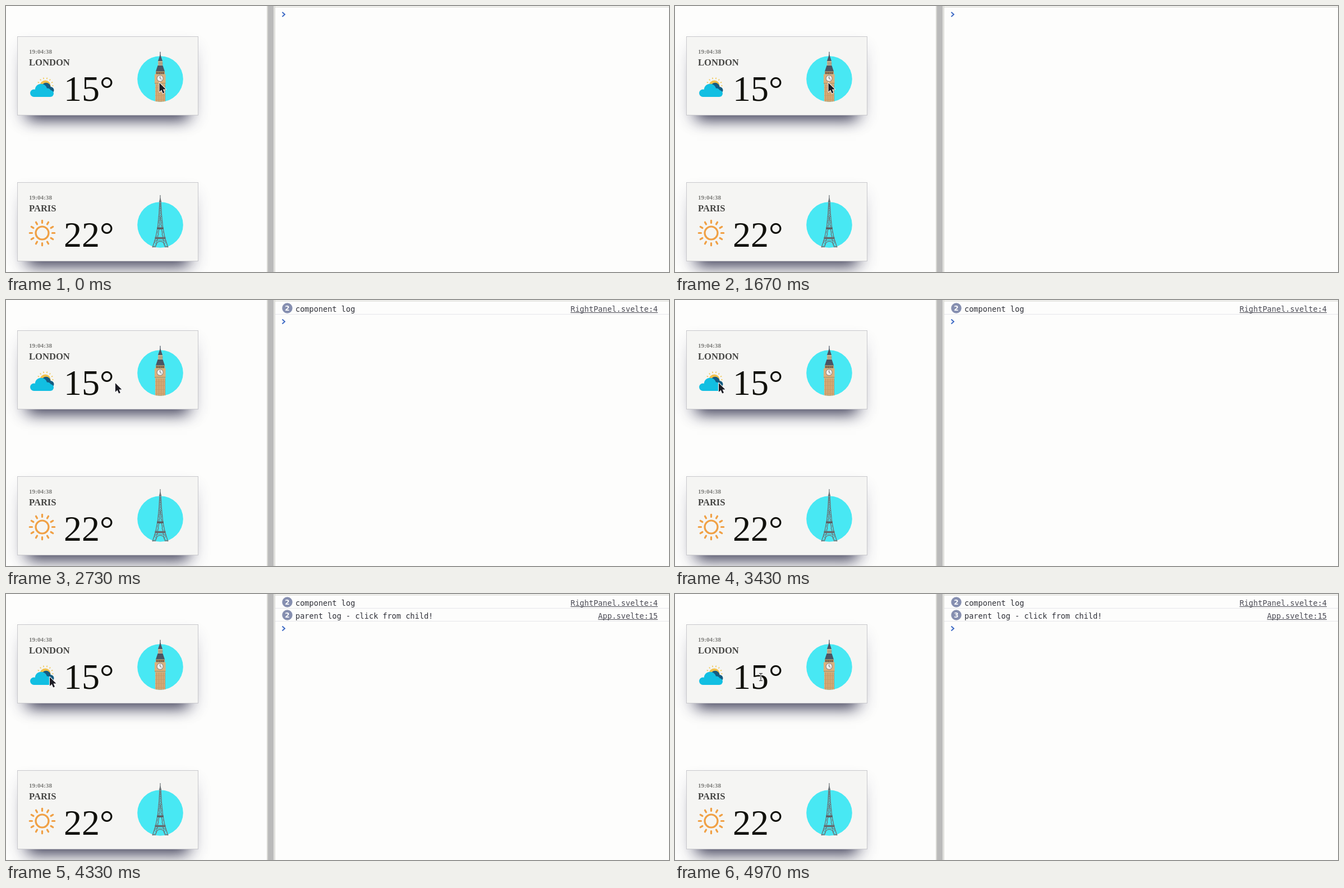
An HTML page with a canvas that plays this animation: 1182 by 474 pixels, repeating every 5.01 s.

```html
<!DOCTYPE html>
<html lang="en">
<head>
<meta charset="utf-8">
<title>Weather cards and console</title>
<style>
  html, body { margin: 0; width: 100%; height: 100%; overflow: hidden; background: #fdfdfc; }
  canvas { display: block; }
</style>
</head>
<body>
<canvas id="stage" width="1182" height="474"></canvas>
<script>
const ctx = document.getElementById('stage').getContext('2d');
const LOOP = 5010;
const SERIF = '"Liberation Serif", serif';
const MONO = '13.6px "DejaVu Sans Mono", monospace';
const SKY = '#48e8f3';
const COMPONENT_CLICKS = [1800, 2200];
const PARENT_CLICKS = [3850, 4100, 4420];

function rect(x, y, w, h, color) {
  ctx.fillStyle = color;
  ctx.fillRect(x, y, w, h);
}

function disc(x, y, r, color) {
  ctx.fillStyle = color;
  ctx.beginPath();
  ctx.arc(x, y, r, 0, Math.PI * 2);
  ctx.fill();
}

function trace(points) {
  ctx.beginPath();
  points.forEach(([x, y]) => ctx.lineTo(x, y));
}

function poly(points, color) {
  trace(points);
  ctx.closePath();
  ctx.fillStyle = color;
  ctx.fill();
}

function line(points, color, width) {
  trace(points);
  ctx.strokeStyle = color;
  ctx.lineWidth = width;
  ctx.stroke();
}

function text(str, x, y, font, color, align = 'left') {
  ctx.font = font;
  ctx.fillStyle = color;
  ctx.textAlign = align;
  ctx.fillText(str, x, y);
}

function rays(x, y, count, inner, outer, color, width) {
  for (let i = 0; i < count; i++) {
    const a = i * Math.PI * 2 / count;
    const c = Math.cos(a), s = Math.sin(a);
    line([[x + c * inner, y + s * inner], [x + c * outer, y + s * outer]], color, width);
  }
}

function smooth(t, start, end) {
  const u = Math.min(1, Math.max(0, (t - start) / (end - start)));
  return u * u * (3 - 2 * u);
}

// Casts only the shadow: the caster itself stays far off the stage.
function shadow(x, y, w, h, dy, blur, spread, color) {
  const away = 3000;
  ctx.save();
  ctx.shadowColor = color;
  ctx.shadowBlur = blur;
  ctx.shadowOffsetX = away;
  ctx.shadowOffsetY = dy;
  rect(x - spread - away, y - spread, w + spread * 2, h + spread * 2, '#000');
  ctx.restore();
}

function cloudyIcon() {
  const back = '#155b80', front = '#12bfe2';
  ctx.lineCap = 'round';
  rays(70, 142, 14, 12.8, 14, '#f0c95c', 1.7);
  disc(70, 142, 9.5, '#efc04c');
  disc(71.5, 145, 8.2, back);
  disc(79.5, 150, 6, back);
  disc(49.8, 155.3, 6.7, front);
  disc(62.5, 149.5, 10.8, front);
  disc(74, 153, 6.5, front);
  disc(79, 156, 6, front);
  rect(49.8, 151, 29.2, 11, front);
}

function sunnyIcon() {
  ctx.lineCap = 'round';
  ctx.strokeStyle = '#f0a044';
  ctx.lineWidth = 3.2;
  ctx.beginPath();
  ctx.arc(64.5, 404.5, 11.5, 0, Math.PI * 2);
  ctx.stroke();
  rays(64.5, 404.5, 12, 18, 22.2, '#f0a044', 3.2);
}

function clockTower() {
  disc(275, 130, 40.8, SKY);
  ctx.save();
  ctx.beginPath();
  ctx.rect(234, 75, 82, 55);
  ctx.arc(275, 130, 40.8, 0, Math.PI);
  ctx.clip();
  const roof = '#4b5563', stone = '#d9ae7b', dark = '#b98d5c';
  line([[275, 82], [275, 92]], roof, 1.2);
  poly([[275, 86], [271, 98], [279, 98]], roof);
  rect(271, 98, 8, 8, '#c9b691');
  for (let x = 272.5; x < 279; x += 2) rect(x, 100, 0.8, 5, '#8a8371');
  poly([[270.5, 106], [279.5, 106], [283, 116.5], [267, 116.5]], roof);
  rect(267, 116.5, 16, 5, '#b48456');
  for (let x = 268.5; x < 282; x += 3.5) rect(x, 118, 2, 3.5, '#5c524b');
  rect(265, 121.5, 19.5, 15.5, '#dbb07d');
  disc(274.7, 129, 6, '#8a8382');
  disc(274.7, 129, 5, '#f1f0ed');
  line([[274.7, 125.5], [274.7, 129], [277, 130.5]], '#5d5d65', 1);
  rect(265, 137, 19.5, 1.5, dark);
  rect(266, 138.5, 18, 33, stone);
  for (let x = 268; x < 284; x += 3) rect(x, 140, 0.9, 31, dark);
  for (let y = 145; y < 170; y += 7) rect(266, y, 18, 0.7, '#c59a69');
  ctx.restore();
}

function latticeTower() {
  disc(275, 390, 40.8, SKY);
  const iron = '#6c7276';
  ctx.lineCap = 'butt';
  line([[275, 337], [275, 350]], iron, 1.2);
  poly([[275, 341], [272.8, 349], [277.2, 349]], iron);
  for (const side of [-1, 1]) {
    const at = (dx, y) => [275 + side * dx, y];
    line([at(1, 348), at(2.2, 370), at(4.6, 394), at(8.5, 414), at(13.8, 430)], iron, 1.3);
    line([at(0.3, 375), at(1.8, 395), at(4.8, 414), at(8.5, 430)], iron, 1);
    const brace = [];
    for (let i = 0; i < 12; i++) {
      const u = i / 11;
      const outer = 3.2 + 10.3 * u * u;
      brace.push(at(i % 2 ? outer : 0.6 + 7.6 * u * u, 380 + 50 * u));
    }
    line(brace, iron, 0.8);
    line([at(14.3, 429.3), at(8, 429.3)], iron, 1.3);
  }
  for (let y = 351; y < 378; y += 4) {
    const w = 0.8 + (y - 348) * 0.05;
    line([[275 - w, y], [275 + w, y + 4]], iron, 0.9);
    line([[275 + w, y], [275 - w, y + 4]], iron, 0.9);
  }
  rect(269.3, 394.5, 11.4, 3.5, '#5c6064');
  rect(265.5, 411.8, 19, 3.6, '#666a6e');
  line([[264, 418], [286, 418]], iron, 0.8);
  ctx.strokeStyle = iron;
  ctx.lineWidth = 1.1;
  ctx.beginPath();
  ctx.arc(275, 427, 7.5, Math.PI, 0);
  ctx.stroke();
}

function card(y, city, temp) {
  shadow(20, y, 323, 140, 13, 27, -5, 'rgba(50,50,93,.2)');
  shadow(20, y, 323, 140, 28, 25, -20, 'rgba(15,15,45,.74)');
  rect(20, y, 323, 140, '#f5f5f3');
  ctx.strokeStyle = '#c8c8cc';
  ctx.lineWidth = 1;
  ctx.strokeRect(20.5, y - 0.5, 322, 140);
  text('19:04:38', 41, y + 30, 'bold 11.2px ' + SERIF, '#7c7c79');
  text(city, 41, y + 51, 'bold 16.6px ' + SERIF, '#464644');
  text(temp, 103, y + 114, '64px ' + SERIF, '#11110c');
}

function logRow(y, count, message, link) {
  if (count > 1) {
    disc(501.5, y + 14.5, 9.2, '#868fb0');
    text(count, 501.5, y + 19, 'bold 12px "DejaVu Sans", sans-serif', '#fff', 'center');
  }
  text(message, 516, y + 21, MONO, '#2f3038');
  text(link, 1162, y + 21, MONO, '#4c4c56', 'right');
  const w = ctx.measureText(link).width;
  rect(1162 - w, y + 22, w, 1, '#4c4c56');
  rect(480, y + 25, 702, 1, '#e6e6ea');
}

function consolePanel(t) {
  rect(465, 0, 15, 474, '#d8d8d4');
  rect(467, 0, 10, 474, '#bababa');
  rect(477, 0, 2, 474, '#e3e3e0');
  rect(480, 1, 702, 1.5, '#deded9');
  const logs = [
    [COMPONENT_CLICKS, 'component log', 'RightPanel.svelte:4'],
    [PARENT_CLICKS, 'parent log - click from child!', 'App.svelte:15']
  ];
  let y = 0;
  for (const [clicks, message, link] of logs) {
    const count = clicks.filter(at => t >= at).length;
    if (!count) continue;
    logRow(y, count, message, link);
    y += 23;
  }
  const mid = y ? y + 15.5 : 15;
  ctx.lineCap = 'butt';
  line([[492.5, mid - 4], [497, mid], [492.5, mid + 4]], '#3c69c4', 1.9);
}

function arrow(x, y) {
  const shape = [[0, 0], [0, 16], [3.7, 12.6], [6.2, 18.4], [9, 17.2], [6.5, 11.6], [11.5, 11.6]]
    .map(([dx, dy]) => [x + dx, y + dy]);
  trace(shape);
  ctx.closePath();
  ctx.lineJoin = 'round';
  ctx.strokeStyle = '#fff';
  ctx.lineWidth = 2;
  ctx.stroke();
  poly(shape, '#1d1d24');
  ctx.lineJoin = 'miter';
}

function textCursor(x, y) {
  for (const [color, width] of [['#fff', 2.8], ['#222', 1.1]]) {
    line([[x, y - 6], [x, y + 6]], color, width);
    for (const end of [-6.5, 6.5]) line([[x - 3, y + end], [x + 3, y + end]], color, width);
  }
}

function pointer(t) {
  const x = 273.5 - 195.5 * smooth(t, 2400, 3162) + 75 * smooth(t, 4700, 4970);
  const y = 137 + 11 * smooth(t, 2400, 2700);
  if (x > 104 && x < 192) textCursor(x, y);
  else arrow(x, y);
}

function draw(now) {
  const t = now % LOOP;
  rect(0, 0, 1182, 474, '#fdfdfc');
  card(55, 'LONDON', '15°');
  card(315, 'PARIS', '22°');
  cloudyIcon();
  sunnyIcon();
  clockTower();
  latticeTower();
  consolePanel(t);
  pointer(t);
}

const start = performance.now();
function tick() {
  draw(performance.now() - start);
  requestAnimationFrame(tick);
}
tick();
</script>
</body>
</html>
```
